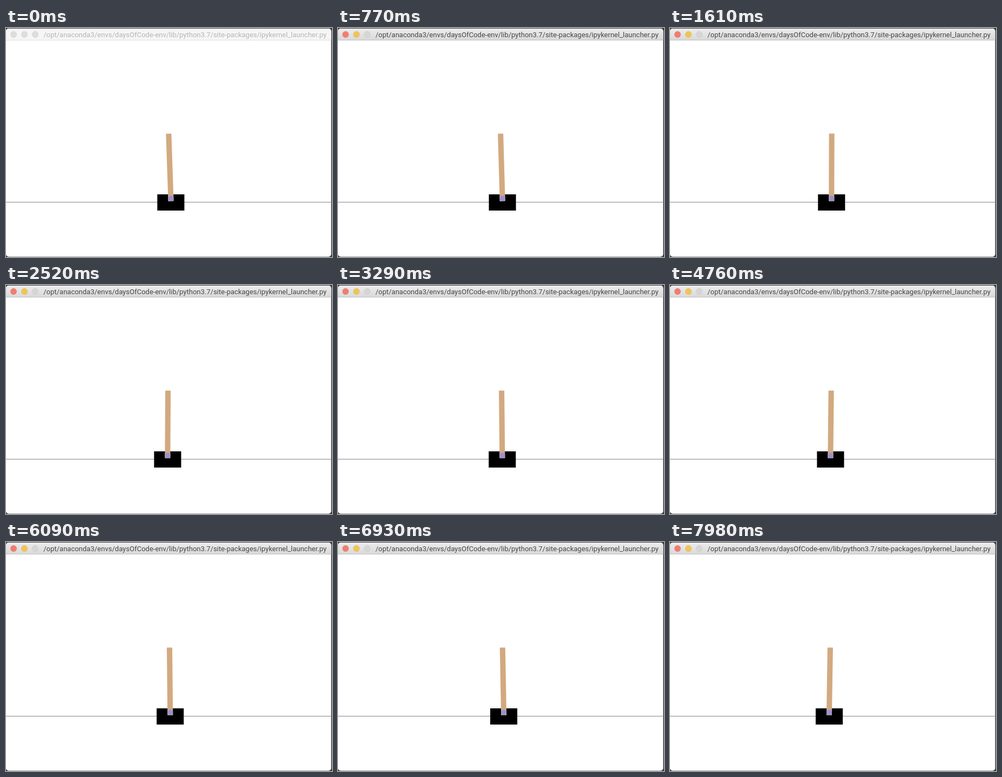
Animation, 602 px wide and 424 px high, one loop 8 s. Source, as an HTML page:

```html
<!DOCTYPE html>
<html lang="en">
<head>
<meta charset="utf-8">
<title>Cart pole</title>
<style>
  html, body { margin: 0; width: 100%; height: 100%; overflow: hidden; background: #3b3b3d; }
  svg { display: block; width: 602px; height: 424px; }
  text { font: 13px Roboto, sans-serif; text-anchor: middle; }
</style>
</head>
<body>
<svg viewBox="0 0 602 424">
  <defs>
    <linearGradient id="chrome" x1="0" y1="0" x2="0" y2="1">
      <stop offset="0" stop-color="#eeeeee"/>
      <stop offset="1" stop-color="#d9d9d9"/>
    </linearGradient>
    <clipPath id="frame"><rect y="1" width="600.5" height="422.4" rx="5"/></clipPath>
  </defs>
  <rect width="602" height="424" fill="#3b3b3d"/>
  <g clip-path="url(#frame)">
    <rect width="602" height="424" fill="#fff"/>
    <rect id="bar" width="602" height="22"/>
    <rect id="rule" y="22" width="602" height="1"/>
    <g id="lights" stroke="#000" stroke-opacity=".08" stroke-width=".6">
      <circle cx="14" cy="12" r="5.9"/>
      <circle cx="34" cy="12" r="5.9"/>
      <circle cx="54" cy="12" r="5.9"/>
    </g>
    <text id="title" x="330.5" y="17">/opt/anaconda3/envs/daysOfCode-env/lib/python3.7/site-packages/ipykernel_launcher.py</text>
    <rect y="322" width="601" height="1" fill="#858585"/>
    <g id="cart">
      <rect x="-25" y="308" width="50" height="30"/>
      <g id="pole">
        <rect x="-5" y="195.5" width="10" height="125" fill="#d2a980"/>
        <rect x="-5" y="311" width="10" height="9.5" fill="#b3a2b4"/>
      </g>
      <circle cy="315.5" r="5" fill="#9a92cf"/>
    </g>
  </g>
</svg>
<script>
const LOOP = 8000, STEP = 70, START = 420;
const $ = id => document.getElementById(id);

// Turning points of the sway; the cart and pole swing smoothly between them
const turns = [
  { at: START, x: 304.4, tilt: -1.9 },
  { at: 2060, x: 297, tilt: .6 },
  { at: 3600, x: 304, tilt: -.7 },
  { at: 4800, x: 296.4, tilt: .6 },
  { at: 6860, x: 306.2, tilt: -1.1 },
  { at: LOOP, x: 294, tilt: .9 }
];

const mix = (a, b, u) => a + (b - a) * u;
const swing = u => (1 - Math.cos(Math.PI * u)) / 2;

function pose(t) {
  const i = turns.findIndex(p => p.at > t);
  const a = turns[i - 1], b = turns[i];
  const u = swing((t - a.at) / (b.at - a.at));
  return { x: mix(a.x, b.x, u), tilt: mix(a.tilt, b.tilt, u) };
}

function drawChrome(active) {
  $('bar').setAttribute('fill', active ? 'url(#chrome)' : '#f6f6f6');
  $('rule').setAttribute('fill', active ? '#c2c2c2' : '#dedede');
  $('title').setAttribute('fill', active ? '#464646' : '#b5b5b5');
  const fills = active ? ['#f17d71', '#f0c455', '#d6d6d6'] : Array(3).fill('#dddddd');
  fills.forEach((fill, i) => $('lights').children[i].setAttribute('fill', fill));
}

function draw(time) {
  const t = Math.floor(time % LOOP / STEP) * STEP;
  const { x, tilt } = pose(Math.max(t, START));
  drawChrome(t >= START);
  $('cart').setAttribute('transform', `translate(${x} 0)`);
  $('pole').setAttribute('transform', `rotate(${tilt} 0 315.5)`);
}

const begin = performance.now();
function tick() {
  draw(performance.now() - begin);
  requestAnimationFrame(tick);
}
tick();
</script>
</body>
</html>
```
